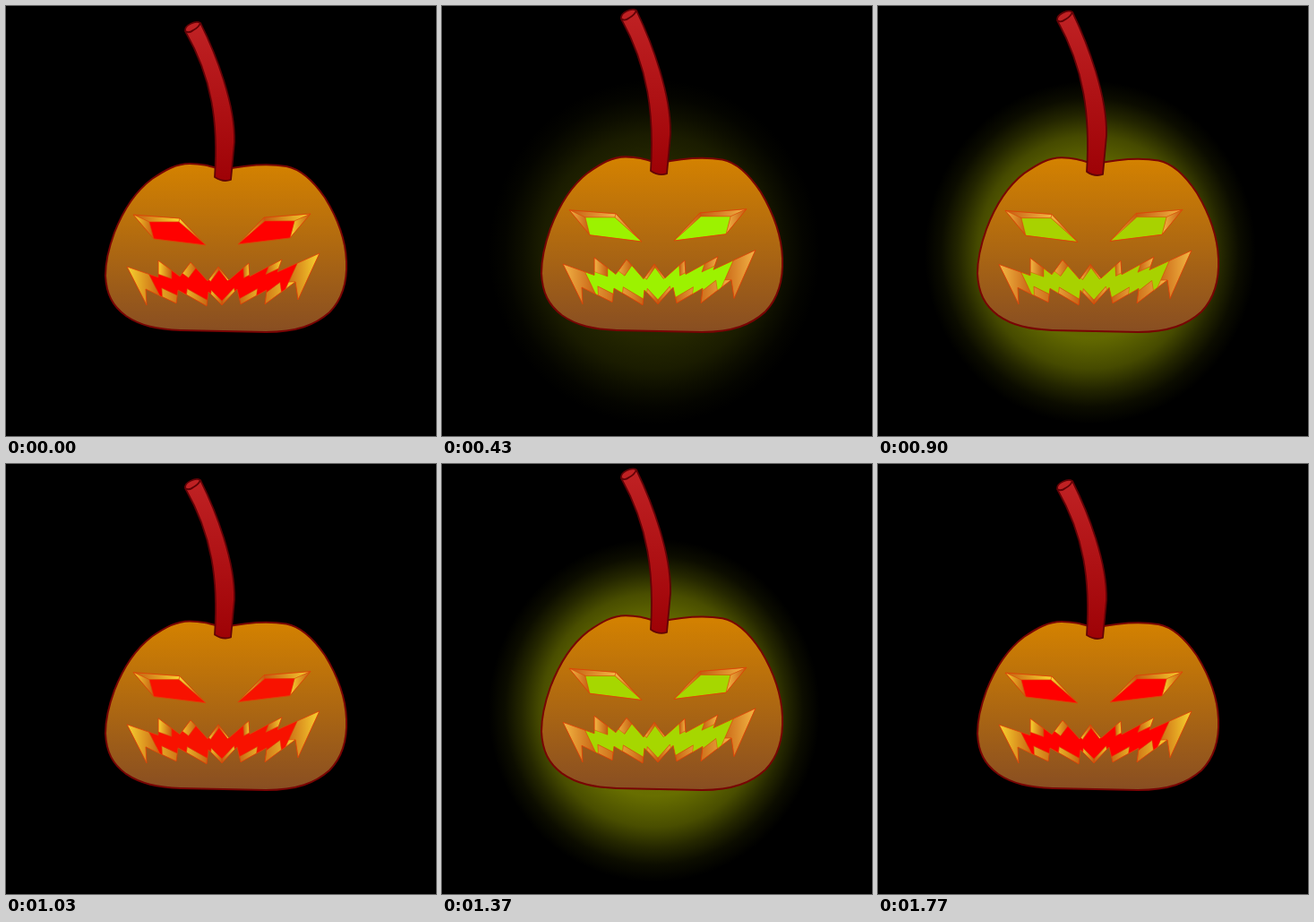
An HTML page that plays this animation: 480x480 px, repeating every 1810 ms.

```html
<!DOCTYPE html>
<html lang="en">
<head>
<meta charset="utf-8">
<title>Glowing pumpkin</title>
<style>
html, body { margin: 0; width: 100%; height: 100%; overflow: hidden; background: #000; }
svg { display: block; width: 100vw; height: 100vh; }
</style>
</head>
<body>
<svg viewBox="0 0 480 480">
  <defs>
    <linearGradient id="skin" x1="0" y1="0" x2="0" y2="1">
      <stop offset="0" stop-color="#d48200"/>
      <stop offset="1" stop-color="#884e22"/>
    </linearGradient>
    <linearGradient id="bark" x1="0" y1="0" x2="0" y2="1">
      <stop offset="0" stop-color="#c02224"/>
      <stop offset="1" stop-color="#9e0206"/>
    </linearGradient>
    <radialGradient id="halo">
      <stop offset=".5" stop-color="#7c8400" stop-opacity=".85"/>
      <stop offset=".68" stop-color="#7c8400" stop-opacity=".6"/>
      <stop offset=".8" stop-color="#7c8400" stop-opacity=".3"/>
      <stop offset=".9" stop-color="#7c8400" stop-opacity=".1"/>
      <stop offset="1" stop-color="#7c8400" stop-opacity="0"/>
    </radialGradient>
    <linearGradient id="wall0">
      <stop offset="0" stop-color="#c45c10"/>
      <stop class="lit" offset="1"/>
    </linearGradient>
    <linearGradient id="wall1">
      <stop class="lit" offset="0"/>
      <stop offset="1" stop-color="#c45c10"/>
    </linearGradient>
  </defs>
  <rect width="480" height="480"/>
  <g id="pumpkin">
    <circle id="glow" cx="237" cy="278" r="185" fill="url(#halo)"/>
    <path fill="url(#skin)" stroke="#780404" stroke-width="2" d="M242 183C228 179 220 176 205 176C190 176 178 183 163 193C143 208 130 230 121 253C114 272 111 286 111 301C112 322 119 335 134 346C150 357 169 361 195 362L290 364C325 364 345 356 361 342C375 328 381 309 380 285C379 259 369 235 356 214C343 195 329 182 313 179C294 176 270 177 242 183Z"/>
    <g stroke="#620206" stroke-width="1.8" stroke-linejoin="round">
      <path fill="url(#bark)" d="M200 28C199 21 212 16 217 19C235 55 256 110 255 152L251 194Q242 197 233 191C237 130 230 80 200 28Z"/>
      <path fill="none" d="M200 28Q204 31 209 27Q215 24 217 19"/>
    </g>
    <g id="face" stroke-linejoin="round"></g>
  </g>
</svg>
<script>
const LOOP = 1810;
const AXIS = 241;
const $ = id => document.getElementById(id);
const parse = text => text.split(" ").map(p => p.split(",").map(Number));
const flip = points => points.map(([x, y]) => [2 * AXIS - x, y - 1]);
// The back edge of a cut lies closer to the middle of the pumpkin.
const recede = points => points.map(([x, y]) => [AXIS + (x - AXIS) * .79, 310 + (y - 310) * .8]);

const eye = parse("142,233 194,237 223,267 165,260");
const eyeBack = parse("160,241 193,241 223,267 165,260");
const mouth = parse("135,291 170,303 170,284 194,302 206,286 225,307 237,291 249,306 271,287 272,302 308,283 303,297 " +
  "350,276 326,328 323,308 289,333 291,317 262,333 258,316 241,334 226,319 224,335 192,317 190,332 156,316 157,334");

// Side walls join front and back edges; the hole shows through the front outline only.
function carve(front, back, name) {
  const walls = front.map((p, i) => {
    const j = (i + 1) % front.length;
    return `<polygon points="${[p, front[j], back[j], back[i]].join(" ")}" fill="url(#wall${i % 2})"/>`;
  });
  return `<clipPath id="${name}"><polygon points="${front.join(" ")}"/></clipPath>
    <g clip-path="url(#${name})" stroke="#de4a08" stroke-width=".5">${walls.join("")}
      <polygon class="hole" points="${back.join(" ")}"/></g>
    <polygon points="${front.join(" ")}" fill="none" stroke="#de4208" stroke-width=".8"/>`;
}
$("face").innerHTML = carve(eye, eyeBack, "left") + carve(flip(eye), flip(eyeBack), "right") +
  carve(mouth, recede(mouth), "grin");
const holes = document.querySelectorAll(".hole");
const lit = document.querySelectorAll(".lit");

const pulses = [
  { start: 0, peak: 455, end: 650, shine: .35 },
  { start: 680, peak: 880, end: 1000, shine: 1 },
  { start: 1000, peak: 1440, end: 1760, shine: 1 }
];
const clamp = v => Math.min(1, Math.max(0, v));
const mix = (a, b, p) => `rgb(${a.map((v, i) => Math.round(v + (b[i] - v) * p))})`;

function draw(t) {
  const { start, peak, end, shine } = pulses.find(pulse => t < pulse.end) || pulses[2];
  const p = clamp(Math.min((t - start) / (peak - start), (end - t) / (end - peak)));
  $("pumpkin").setAttribute("transform", `translate(0 364) scale(1 ${1 + .043 * p}) translate(0 -364)`);
  $("glow").setAttribute("opacity", shine * clamp((p - .45) / .4));
  const holeColor = mix([255, 0, 0], [150, 255, 0], p);
  const litColor = mix([248, 212, 48], [242, 178, 72], p);
  holes.forEach(hole => hole.setAttribute("fill", holeColor));
  lit.forEach(stop => stop.setAttribute("stop-color", litColor));
}

function tick() {
  draw(performance.now() % LOOP);
  requestAnimationFrame(tick);
}
tick();
</script>
</body>
</html>
```
